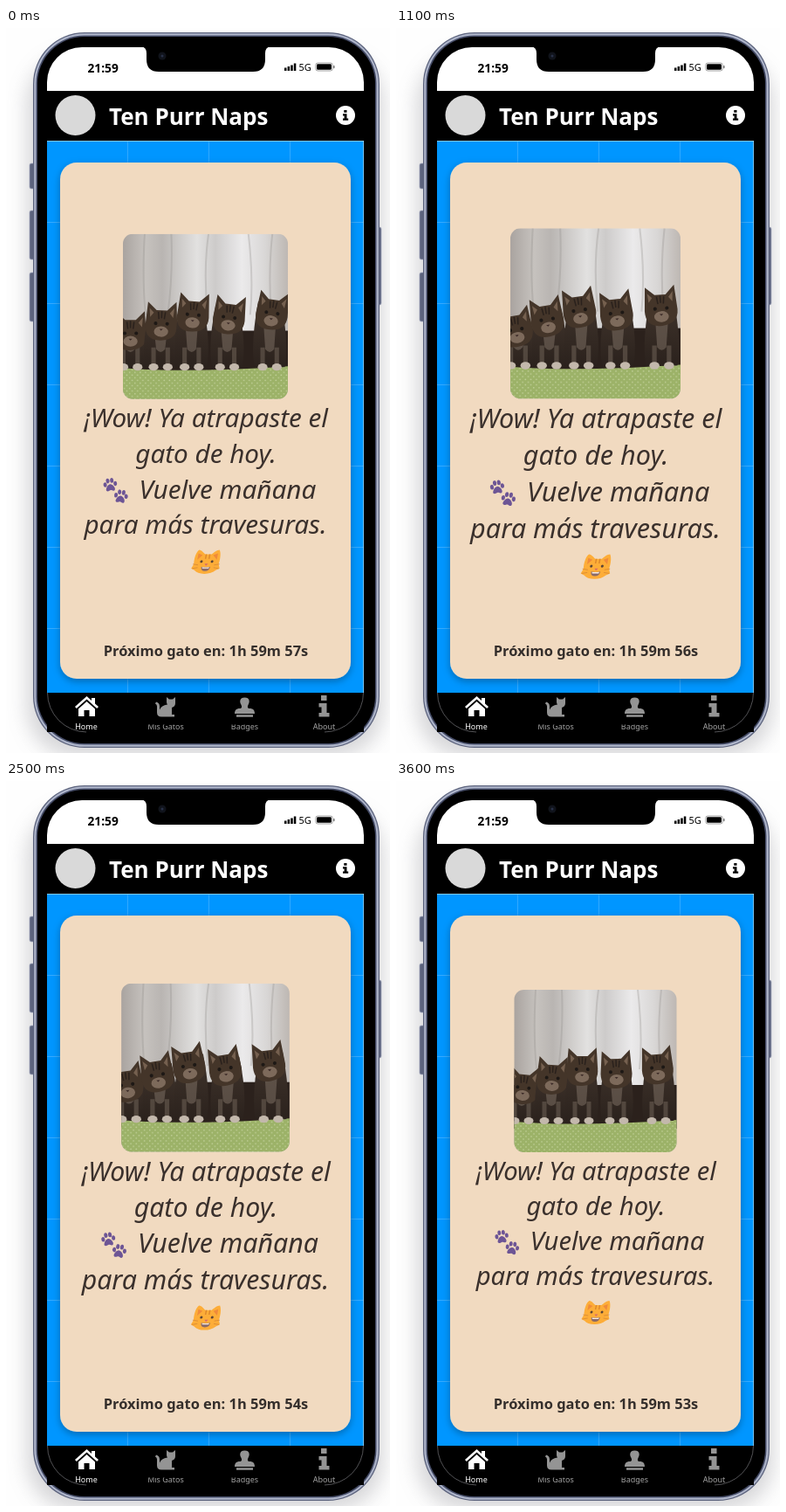
Write an HTML page that moves like this. It is 440 px wide and 830 px high and loops after 3700 ms.

```html
<!DOCTYPE html>
<html lang="es">
<head>
<meta charset="utf-8">
<style>
html, body { margin: 0; width: 100%; height: 100%; overflow: hidden; background: #fefefe; }
svg { display: block; width: 440px; height: 830px; font-family: "Noto Sans", "Open Sans", sans-serif; }
.mid { text-anchor: middle; }
.bold { font-weight: 700; }
.message { font-size: 29.2px; font-style: italic; fill: #3a302c; }
.tab { font-size: 9px; fill: #a2a2a2; }
</style>
</head>
<body>
<svg viewBox="0 0 440 830">
  <defs>
    <filter id="soft" x="-20%" y="-10%" width="140%" height="120%"><feGaussianBlur stdDeviation="11"/></filter>
    <filter id="lift" x="-10%" y="-10%" width="120%" height="120%"><feDropShadow dx="0" dy="3" stdDeviation="4" flood-opacity=".3"/></filter>
    <linearGradient id="curtain">
      <stop offset="0" stop-color="#a9a39f"/><stop offset=".14" stop-color="#c6c2be"/>
      <stop offset=".24" stop-color="#b9b5b2"/><stop offset=".45" stop-color="#e2e1e0"/>
      <stop offset=".56" stop-color="#cdcbca"/><stop offset=".72" stop-color="#ebeaeb"/>
      <stop offset=".86" stop-color="#d9d7d6"/><stop offset="1" stop-color="#bdb7b2"/>
    </linearGradient>
    <linearGradient id="fur" x2="0" y2="1">
      <stop offset="0" stop-color="#40342c"/><stop offset="1" stop-color="#2b221d"/>
    </linearGradient>
    <pattern id="grid" x="47" y="130" width="93" height="93" patternUnits="userSpaceOnUse">
      <path d="M93 0V93M0 93H93" stroke="#46b1ff" stroke-width="1.4"/>
    </pattern>
    <pattern id="dots" width="6" height="6" patternUnits="userSpaceOnUse">
      <rect width="6" height="6" fill="#9cb268"/><circle cx="2" cy="2" r=".8" fill="#c3d29b"/><circle cx="5" cy="5" r=".8" fill="#c3d29b"/>
    </pattern>
    <clipPath id="photo"><rect x="135.5" y="239" width="186" height="186" rx="11"/></clipPath>
    <clipPath id="low"><rect x="140" y="797.5" width="170" height="10"/></clipPath>
    <g id="paw">
      <ellipse cx="-5.5" cy="-1" rx="2" ry="2.7"/><ellipse cx="-2" cy="-5" rx="2" ry="2.8"/>
      <ellipse cx="2.6" cy="-5" rx="2" ry="2.8"/><ellipse cx="6" cy="-1" rx="2" ry="2.7"/>
      <path d="M0-1C3-1 6 4 4.6 6S1 5.7 0 5.7-3.5 7.5-4.8 6-3-1 0-1Z"/>
    </g>
  </defs>

  <!-- phone -->
  <rect x="24" y="30" width="408" height="804" rx="55" fill="#8b8b92" opacity=".35" filter="url(#soft)"/>
  <g fill="#5c637d" stroke="#a4abc0" stroke-width=".7">
    <rect x="27" y="155" width="6" height="29" rx="2"/><rect x="27" y="209" width="6" height="56" rx="2"/>
    <rect x="27" y="280" width="6" height="56" rx="2"/><rect x="426" y="228" width="4" height="89" rx="2"/>
  </g>
  <rect x="31" y="5" width="397" height="819" rx="59" fill="#5b627c"/>
  <rect x="32.2" y="6.2" width="394.6" height="816.6" rx="58" fill="#aeb5ca"/>
  <rect x="34.5" y="8.5" width="390" height="812" rx="55" fill="#444b66"/>
  <rect x="36" y="10" width="387" height="809" rx="54"/>
  <path d="M47 72V62A40 40 0 0 1 87 22H370A40 40 0 0 1 410 62V72Z" fill="#fff"/>
  <path d="M155 21Q161 22 161 29V36Q161 50 175 50H283Q297 50 297 36V29Q297 22 303 21Z"/>
  <circle cx="179" cy="32" r="4.5" fill="#10131b"/><circle cx="179" cy="32" r="1.5" fill="#273047"/>
  <text class="bold" x="93.5" y="51" font-size="13.7">21:59</text>
  <path d="M319 45.5h2.5V49H319zM322.6 44h2.5v5h-2.5zM326.2 42.5h2.5V49h-2.5zM329.8 40.5h2.5V49h-2.5z"/>
  <text x="335.5" y="49" font-size="11" font-weight="500">5G</text>
  <rect x="354.8" y="40" width="19.5" height="9" rx="2.5" fill="none" stroke="#888" stroke-width=".8"/>
  <rect x="356" y="41.2" width="17" height="6.6" rx="1.4"/><rect x="375.2" y="43" width="1.4" height="3.2" rx=".6" fill="#777"/>

  <!-- header -->
  <rect x="47" y="72" width="363" height="57"/>
  <circle cx="79.5" cy="100" r="23" fill="#d9d9d9"/>
  <text class="bold" x="118" y="110.5" font-size="26" fill="#fff">Ten Purr Naps</text>
  <circle cx="389" cy="100" r="11" fill="#fff"/>
  <path d="M387.3 94h3.2v2.8h-3.2zM386 98.2h4.5v5.3h1.7v2.2h-6.2v-2.2h1.6v-3.1H386z"/>

  <!-- page -->
  <rect x="47" y="129" width="363" height="632" fill="#0096ff"/>
  <rect x="47" y="130" width="363" height="631" fill="url(#grid)"/>
  <path d="M47 129.5H410M409.6 129V761" stroke="#9ed4f5" stroke-width=".8"/>
  <rect x="62" y="154" width="333" height="591" rx="19" fill="#f1dac0" filter="url(#lift)"/>

  <g id="pulse">
    <g clip-path="url(#photo)">
      <rect x="135" y="239" width="187" height="187" fill="url(#curtain)"/>
      <path d="M160 239Q157 290 161 330M190 239Q192 285 186 330M232 239Q226 280 231 330M277 239Q283 290 279 330M304 239Q299 285 303 330" fill="none" stroke="#8f8a87" stroke-width="2" opacity=".3"/>
      <rect x="135" y="348" width="187" height="50" fill="#2b211c"/>
      <path d="M135 390Q210 396 322 388V426H135Z" fill="url(#dots)"/>
      <g id="kittens"></g>
    </g>
    <g class="message mid">
      <text x="229" y="457">¡Wow! Ya atrapaste el</text>
      <text x="229" y="497">gato de hoy.</text>
      <text x="253.5" y="537">Vuelve mañana</text>
      <text x="228.5" y="577">para más travesuras.</text>
    </g>
    <g fill="#6d5595">
      <use href="#paw" transform="translate(121 522) rotate(-8)"/>
      <use href="#paw" transform="translate(133 535) rotate(8)"/>
    </g>
    <g transform="translate(230 608) skewX(-11)">
      <path d="M-14 3C-15-4-14-11-11-13-8-13-5-9-3-8H4C6-10 9-13 12-13 14-10 15-4 14 3L16 8 12 10Q8 14 0 14T-12 10L-16 8Z" fill="#fdad38"/>
      <path d="M-11-9-6-7-11-2ZM11-9 6-7 11-2Z" fill="#ef8a3b"/>
      <path d="M-2-8V-3M2-8V-3" stroke="#db872c" stroke-width="1.4"/>
      <circle cx="-6" cy="0" r="1.5" fill="#5b4436"/><circle cx="6" cy="0" r="1.5" fill="#5b4436"/>
      <path d="M-5 6Q0 7 5 6 5 11 0 11T-5 6Z" fill="#8a6a68"/>
      <path d="M-4 6.4Q0 7 4 6.4L3.6 8h-7.2Z" fill="#f6ece4"/>
      <path d="M-2 2.5H2L0 5Z" fill="#d66c68"/>
      <path d="M-15 3-9 4M-15 8-9 7M15 3 9 4M15 8 9 7" stroke="#d98a35" stroke-width=".8"/>
    </g>
  </g>
  <text id="count" class="mid bold" x="229" y="719" font-size="16.45" fill="#342e2b"></text>

  <!-- tabs -->
  <rect x="47" y="761" width="363" height="45"/>
  <path d="M47.5 761A45 45 0 0 0 92 806M409.5 761A45 45 0 0 1 365 806" fill="none" stroke="#66666a" stroke-width=".8"/>
  <path d="M92.5 765 98 770V767h4v6.5l4 3.5-1.8 2L92.5 768.5 80.8 779 79 777ZM83 779.5 92.5 771 102 779.5V788H95.5V781h-6v7H83Z" fill="#fff"/>
  <g fill="#949494">
    <path d="M184 766l3 2.5h4l3-2.5v7q0 4-4 5v8h3v2.5H178q-5 0-5-5v-7q0-2-2-3l1-2q4 1 4 5v4q2-5 9-6-1-1-1-3Z"/>
    <path d="M273.5 766.5c6 0 6 5 4.2 8-1.5 3-.8 4.5 1.5 4.5 4 0 5.8 2 5.8 6h-23c0-4 2-6 5.8-6 2.3 0 3-1.5 1.5-4.5-1.8-3-1.8-8 4.2-8ZM264 786.3h19v2.5h-19z"/>
    <path d="M361 764h6.5v6H361zM358.5 773h9v11h3v4.5h-12V784h3v-6.5h-3z"/>
  </g>
  <g class="tab mid">
    <text x="92" y="803" fill="#fff" font-weight="500">Home</text>
    <text x="364.5" y="803">About</text>
    <g clip-path="url(#low)"><text x="183" y="803">Mis Gatos</text><text x="273.5" y="803">Badges</text></g>
  </g>
</svg>
<script>
const $ = id => document.getElementById(id);
const LOOP = 3700, BEAT = 1500, STEP = 100;
// Growth in thousandths, sampled through one beat.
const swell = [0, 1, 8, 20, 36, 48, 50, 38, 24, 16, 11, 7, 4, 2, 1];

// x and y place the head; the feet stay on the blanket.
function kitten([x, y]) {
  const feet = 389 - y;
  return `<g transform="translate(${x} ${y})">
    <path d="M-13-12Q-22 ${feet - 25}-17 ${feet}H17Q22 ${feet - 25} 13-12Z" fill="url(#fur)"/>
    <path d="M-7 12Q0 18 7 12L5 ${feet - 20}Q0 ${feet - 14}-5 ${feet - 20}Z" fill="#827568" opacity=".5"/>
    <path d="M-8 ${feet - 22}V${feet}M8 ${feet - 22}V${feet}" stroke="#75685c" stroke-width="5" opacity=".5"/>
    <ellipse cx="-8" cy="${feet}" rx="5.5" ry="4" fill="#c3b8ac"/><ellipse cx="8" cy="${feet}" rx="5.5" ry="4" fill="#c3b8ac"/>
    <g class="head">
      <path d="M-18 3-16-23-6-14H6L16-24 18 3Q18 19 0 20T-18 3Z" fill="#443529"/>
      <path d="M-14-16-9-11-13-6ZM14-17 9-11 13-6Z" fill="#75604f"/>
      <path d="M-4-12-3-4M0-13V-5M4-12 3-4" stroke="#2a211c" stroke-width="1.5"/>
      <ellipse cy="10" rx="8" ry="6" fill="#7d6a5b"/>
      <circle cx="-6.5" cy="1" r="2" fill="#1d1815"/><circle cx="6.5" cy="1" r="2" fill="#1d1815"/>
      <path d="M-2 7H2L0 9Z" fill="#3a2926"/>
    </g></g>`;
}

$("kittens").innerHTML = [[144, 350], [178, 339], [213, 329], [253, 332], [301, 327]].map(kitten).join("");
const heads = document.querySelectorAll(".head");

function draw(now) {
  const t = Math.floor(now % LOOP / STEP) * STEP;
  const phase = (t - 600 + BEAT) % BEAT;
  const scale = 1 + swell[phase / STEP] / 1000;
  $("pulse").setAttribute("transform", `translate(228.5 440) scale(${scale}) translate(-228.5 -440)`);

  // All heads stretch up once per loop and sway in between.
  const stretch = Math.exp(-(((t - 1650) / 350) ** 2));
  heads.forEach((head, i) => {
    const sway = 3 * Math.sin(t / 240 + i * .3);
    head.setAttribute("transform", `translate(${sway + 6 * stretch} ${-18 * stretch}) rotate(${sway * 3})`);
  });

  const left = 57 - Math.floor((t + 600) / 1000);
  $("count").textContent = `Próximo gato en: 1h 59m ${left}s`;
}

const start = performance.now();
function tick() {
  draw(performance.now() - start);
  requestAnimationFrame(tick);
}
tick();
</script>
</body>
</html>
```
